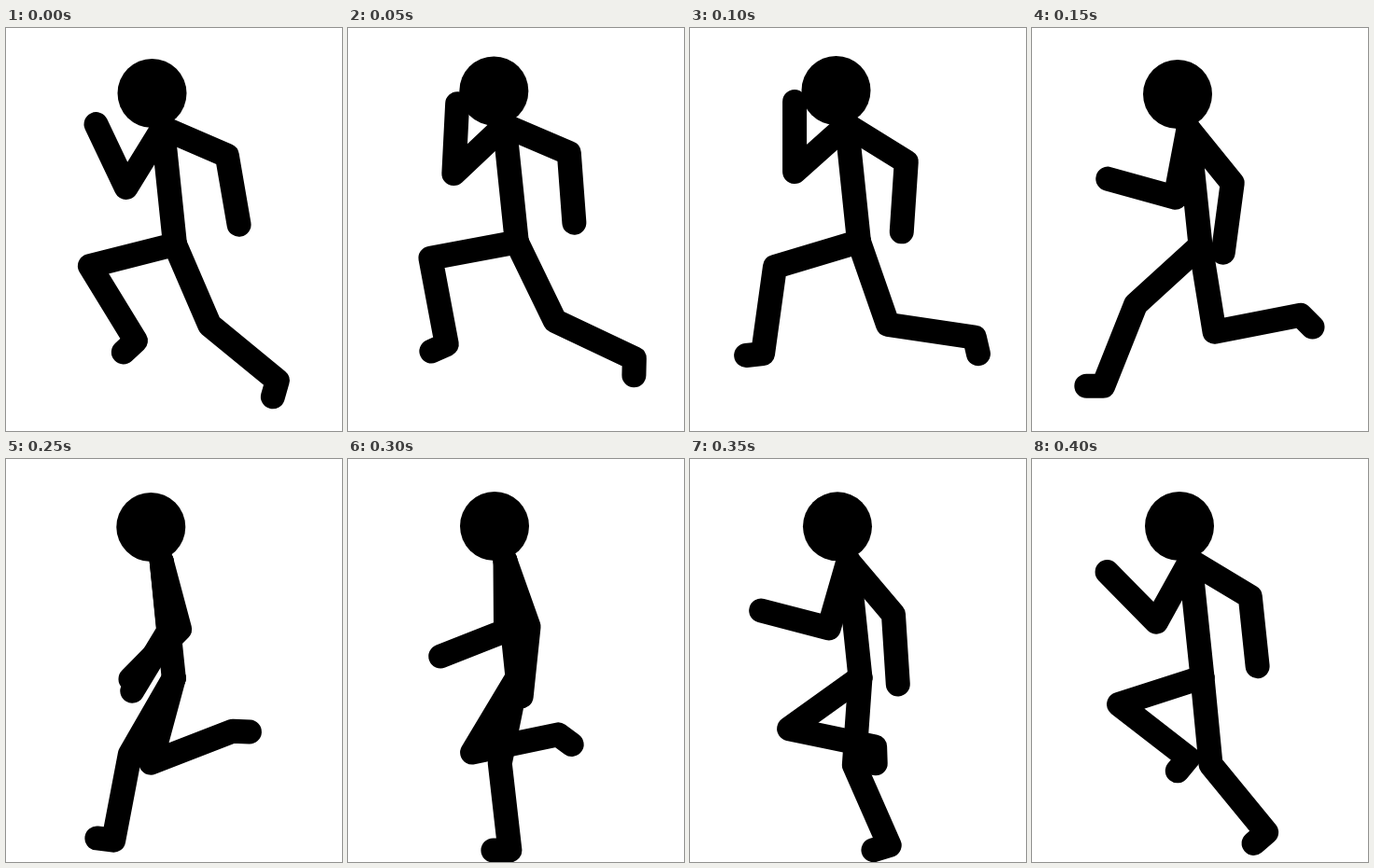
Write an HTML page with a canvas that moves like this. It is 360 by 432 pixels and loops after 450 ms.

```html
<!DOCTYPE html>
<html lang="en">
<head>
<meta charset="utf-8">
<title>Running stick figure</title>
<style>
  html, body { margin: 0; width: 100%; height: 100%; overflow: hidden; background: #fff; }
  canvas { display: block; }
</style>
</head>
<body>
<canvas id="stage" width="360" height="432"></canvas>
<script>
const ctx = document.getElementById("stage").getContext("2d");

const STEP_MS = 50, LOOP_STEPS = 9, STRIDE_STEPS = 18;
const ARM = 75, LIMB = 94, FOOT = 18;

// Key steps of a full stride. The opposite limb runs half a stride later.
const KEYS = [0, 2, 3, 4, 6, 8, 9, 11, 12, 13, 15, 17];

// Segment angles in degrees: 0 points right, 90 points down.
const upperArm = [121.6, 138.2, 100.7, 82, 70.5, 31, 23.4, 31.8, 51, 74.3, 89.6, 119];
const forearm = [244.6, 270, 195.5, 173.2, 96, 84, 80.2, 93.8, 97.6, 97, 158.5, 225.5];
const thigh = [165.8, 163.3, 137.6, 134.6, 101.5, 84.5, 66.7, 70.8, 80.8, 91.8, 121, 162.1];
const shin = [58.5, 97.9, 111.7, 111.9, 83.5, 50.6, 39.4, 8.5, -11, -20.8, -11.8, 37.8];
const foot = [137, 174, 180, 187, 180, 139, 106, 77, 45, 0, 36, 130];

const twice = values => values.concat(values);
const headX = twice([156.5, 156.5, 156, 154.5, 157, 158]);
const headY = twice([70, 67, 71, 73, 72, 72]);

// Cubic through the two keys on either side of the step, wrapping around.
function sample(track, step) {
  step %= STRIDE_STEPS;
  const count = KEYS.length;
  const last = KEYS.filter(key => key <= step).length - 1;
  const points = [-1, 0, 1, 2].map(offset => {
    const i = last + offset, lap = Math.floor(i / count), k = i - lap * count;
    return { x: KEYS[k] + lap * STRIDE_STEPS, y: track[k] };
  });
  return points.reduce((sum, p) => sum + points.reduce(
    (w, q) => q === p ? w : w * (step - q.x) / (p.x - q.x), p.y), 0);
}

function drawLimb(x, y, segments, step) {
  ctx.beginPath();
  ctx.moveTo(x, y);
  for (const [track, length] of segments) {
    const angle = sample(track, step) * Math.PI / 180;
    x += length * Math.cos(angle);
    y += length * Math.sin(angle);
    ctx.lineTo(x, y);
  }
  ctx.stroke();
}

function drawRunner(step) {
  const x = sample(headX, step), y = sample(headY, step);
  const shoulder = [x + 11.5, y + 37], hip = [x + 24.5, y + 162];

  ctx.fillStyle = "#fff";
  ctx.fillRect(0, 0, 360, 432);
  ctx.fillStyle = ctx.strokeStyle = "#000";
  ctx.lineWidth = 26;
  ctx.lineCap = ctx.lineJoin = "round";

  ctx.beginPath();
  ctx.arc(x, y, 37, 0, Math.PI * 2);
  ctx.fill();

  ctx.beginPath();
  ctx.moveTo(...shoulder);
  ctx.lineTo(...hip);
  ctx.stroke();

  for (const phase of [step, step + LOOP_STEPS]) {
    drawLimb(...shoulder, [[upperArm, ARM], [forearm, ARM]], phase);
    drawLimb(...hip, [[thigh, LIMB], [shin, LIMB], [foot, FOOT]], phase);
  }
}

const start = performance.now();
function frame() {
  const elapsed = performance.now() - start;
  drawRunner(Math.floor(elapsed / STEP_MS) % LOOP_STEPS);
  requestAnimationFrame(frame);
}
frame();
</script>
</body>
</html>
```
